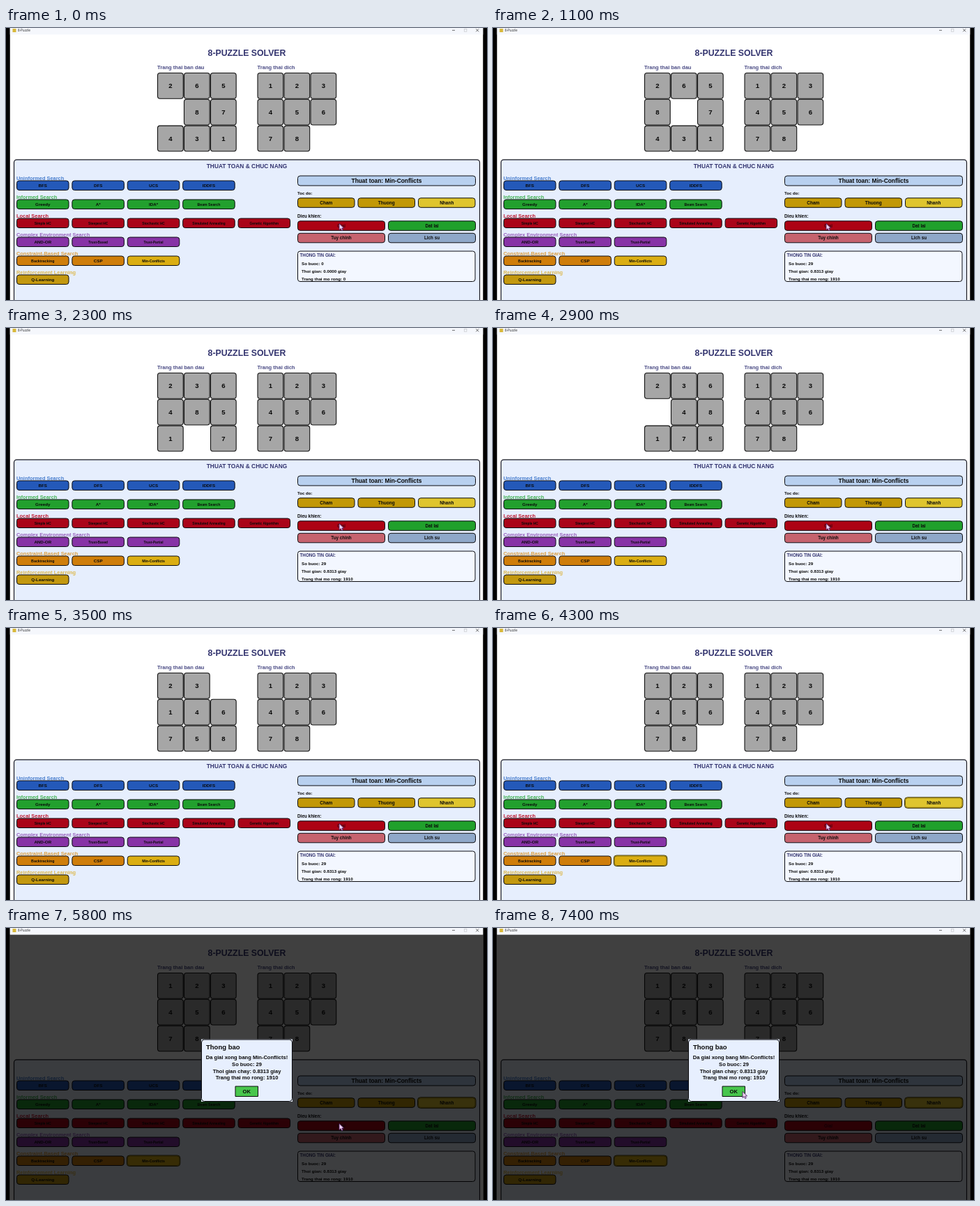
An HTML page with a canvas for the animation above (8400 ms loop, 690 by 390 pixels).

```html
<!DOCTYPE html>
<html lang="vi">
<head>
<meta charset="utf-8">
<title>8-Puzzle</title>
<style>
html, body { margin: 0; width: 100%; height: 100%; overflow: hidden; background: #000; }
canvas { display: block; width: 690px; height: 390px; }
</style>
</head>
<body>
<canvas id="stage" width="690" height="390"></canvas>
<script>
const ctx = document.getElementById('stage').getContext('2d');
const LOOP = 8400;
const STEP_START = 442, STEP = 130;
const SOLVED = 4212, DIALOG = 4350;
const LEFT = 5.5, WIDTH = 679, BAR = 9.4;
const INK = '#33346f';
const FONT = '"Liberation Sans", Arial, sans-serif';

// Blank moves from the start board to the goal
const START = '265087431', GOAL = '123456780';
const MOVES = 'RLRLR' + 'DRUULDLDR' + 'RULLDRRUU' + 'LLDRDR';
const SHIFT = { L: -1, R: 1, U: -3, D: 3 };
const boards = [START];
for (const m of MOVES) {
  const b = [...boards[boards.length - 1]];
  const i = b.indexOf('0'), j = i + SHIFT[m];
  [b[i], b[j]] = [b[j], b[i]];
  boards.push(b.join(''));
}

const GROUPS = [
  ['Uninformed Search', '#4a7fce', '#2459b9', ['BFS', 'DFS', 'UCS', 'IDDFS']],
  ['Informed Search', '#43b355', '#22a02e', ['Greedy', 'A*', 'IDA*', 'Beam Search']],
  ['Local Search', '#c01c32', '#aa0519',
    ['Simple HC', 'Steepest HC', 'Stochastic HC', 'Simulated Annealing', 'Genetic Algorithm']],
  ['Complex Environment Search', '#9862bd', '#8733a6', ['AND-OR', 'Trust-Based', 'Trust-Partial']],
  ['Constraint-Based Search', '#dda041', '#cf7e0b', ['Backtracking', 'CSP', 'Min-Conflicts']],
  ['Reinforcement Learning', '#ddb84c', '#c3980f', ['Q-Learning']]
];
const SMALL = { 'Beam Search': 5.2, 'Backtracking': 5.3, 'Min-Conflicts': 5.2 };

function text(s, x, y, size, color = '#0a0a0a', align = 'left') {
  ctx.font = `bold ${size}px ${FONT}`;
  ctx.textAlign = align;
  ctx.textBaseline = 'alphabetic';
  ctx.fillStyle = color;
  ctx.fillText(s, x, y + size * 0.36);
}

function box(x, y, w, h, r, fill, line = '#0c0c10', lw = 1) {
  ctx.beginPath();
  ctx.roundRect(x, y, w, h, r);
  ctx.fillStyle = fill;
  ctx.fill();
  ctx.strokeStyle = line;
  ctx.lineWidth = lw;
  ctx.stroke();
}

function button(label, x, y, w, fill, size = 6.3, glow = false, color) {
  if (glow) box(x - 1, y - 1, w + 2, 15.5, 4, '#f2d23c', '#3a3208', 1);
  box(x, y, w, 13.5, 3.5, fill, glow ? '#8a7410' : undefined);
  text(label, x + w / 2, y + 6.8, size, color, 'center');
}

function drawBoard(board, x, y) {
  [...board].forEach((n, i) => {
    if (n === '0') return;
    const tx = x + (i % 3) * 38, ty = y + Math.floor(i / 3) * 37.8;
    box(tx + 0.5, ty + 0.5, 36.7, 36.7, 3.5, '#a6a6a6', '#111', 1.1);
    text(n, tx + 18.8, ty + 18.7, 9.6, '#0a0a0a', 'center');
  });
}

function drawTitleBar() {
  ctx.fillStyle = '#f5f7fc';
  ctx.fillRect(LEFT, 0, WIDTH, BAR);
  ctx.fillStyle = '#d8b83a';
  ctx.fillRect(9.5, 1, 5, 5);
  ctx.font = '4.6px "Open Sans", sans-serif';
  ctx.textAlign = 'left';
  ctx.fillStyle = '#222';
  ctx.fillText('8-Puzzle', 17, 4.9);
  ctx.lineWidth = 0.7;
  ctx.strokeStyle = '#333';
  ctx.beginPath();
  ctx.moveTo(640, 3.3); ctx.lineTo(644, 3.3);
  ctx.moveTo(674.2, 1.3); ctx.lineTo(678.2, 5.3);
  ctx.moveTo(678.2, 1.3); ctx.lineTo(674.2, 5.3);
  ctx.stroke();
  ctx.strokeStyle = '#c3c5ca';
  ctx.strokeRect(657.3, 1.5, 3.6, 3.6);
}

function drawAlgorithms(glow) {
  GROUPS.forEach(([name, tint, fill, items], row) => {
    const y = 219 + row * 27;
    text(name, 15, y - 4, 7.4, tint);
    items.forEach((item, col) => {
      const chosen = item === 'Min-Conflicts';
      const size = SMALL[item] || (item.length > 8 && item !== 'Q-Learning' ? 4.8 : 6.2);
      button(item, 15.5 + col * 79.4, y, 74.5, chosen ? '#dbae12' : fill, size, chosen && glow);
    });
  });
}

function drawControls(solved, glow) {
  box(418.5, 212, 255, 14, 3.5, '#b8d0ef');
  text('Thuat toan: Min-Conflicts', 546, 219, 8.4, '#0a0a0a', 'center');

  text('Toc do:', 418, 237, 6.1);
  button('Cham', 418.5, 243.8, 81.5, '#c29806', 6.5);
  button('Thuong', 505, 243.8, 81.5, '#c29806', 6.5);
  button('Nhanh', 591.5, 243.8, 81.5, '#dfc52e', 6.5, glow);

  text('Dieu khien:', 418, 269.8, 6.4);
  button('Giai', 418.5, 276.8, 125, '#ad0314', 6.3, false, '#4a000e');
  button('Dat lai', 548.5, 276.8, 125, '#20a02c');
  button('Tuy chinh', 418.5, 294.3, 125, '#c6636e');
  button('Lich su', 548.5, 294.3, 125, '#8fa8c9');

  box(418.5, 320, 254.5, 43.5, 3.5, '#f3f7ff');
  text('THONG TIN GIAI:', 421.5, 326.2, 6.3, INK);
  text(`So buoc: ${solved ? 29 : 0}`, 424, 338, 6.2);
  text(`Thoi gian: ${solved ? '0.8313' : '0.0000'} giay`, 424, 349, 6.2);
  text(`Trang thai mo rong: ${solved ? 1910 : 0}`, 424, 360, 6.2);
}

function drawDialog() {
  ctx.fillStyle = 'rgba(0, 0, 0, 0.75)';
  ctx.fillRect(LEFT, BAR, WIDTH, 390 - BAR);
  ctx.fillStyle = '#e7effe';
  ctx.fillRect(280, 159.5, 131, 89.5);
  box(280.5, 160, 130, 88.5, 4, '#e7effe');
  text('Thong bao', 287, 171, 9.5);
  ['Da giai xong bang Min-Conflicts!', 'So buoc: 29',
    'Thoi gian chay: 0.8313 giay', 'Trang thai mo rong: 1910'
  ].forEach((s, i) => text(s, 345.5, 185.7 + i * 9.6, 7.55, '#0a0a0a', 'center'));
  box(329, 227, 32.5, 14.5, 0, '#48c64c');
  text('OK', 345.2, 234.2, 7.6, '#0a0a0a', 'center');
}

function ease(t, from, to) {
  const p = Math.min(1, Math.max(0, (t - from) / (to - from)));
  return p * p * (3 - 2 * p);
}

function drawCursor(t) {
  const k = 0.91 * ease(t, 5800, 6650) + 0.09 * ease(t, 6650, 7120);
  ctx.save();
  ctx.translate(478 - 120 * k, 280.5 - 46 * k);
  ctx.scale(0.9, 0.9);
  ctx.beginPath();
  [[0, 0], [0, 10], [2.4, 7.9], [4, 11.2], [5.8, 10.4], [4.3, 7.3], [7.3, 7]]
    .forEach(([x, y]) => ctx.lineTo(x, y));
  ctx.closePath();
  ctx.fillStyle = '#efd3f0';
  ctx.fill();
  ctx.strokeStyle = '#4a1760';
  ctx.lineWidth = 0.9;
  ctx.stroke();
  ctx.restore();
}

function draw(t) {
  const step = Math.floor((t - STEP_START) / STEP);
  const board = boards[Math.min(MOVES.length, Math.max(0, step))];
  const glow = t >= SOLVED;

  ctx.fillStyle = '#000';
  ctx.fillRect(0, 0, 690, 390);
  ctx.save();
  ctx.beginPath();
  ctx.rect(LEFT, 0, WIDTH, 390);
  ctx.clip();
  ctx.fillStyle = '#fff';
  ctx.fillRect(LEFT, 0, WIDTH, 390);

  text('8-PUZZLE SOLVER', 345.5, 36, 12.3, INK, 'center');
  text('Trang thai ban dau', 217, 56, 7.6, '#4b4c85');
  text('Trang thai dich', 360.5, 56, 7.6, '#4b4c85');
  drawBoard(board, 217, 64);
  drawBoard(GOAL, 360.5, 64);

  box(11.5, 188.8, 668, 215, 4, '#e6eefd', '#1a1a22', 1.2);
  text('THUAT TOAN & CHUC NANG', 345.5, 198, 8.4, INK, 'center');
  drawAlgorithms(glow);
  drawControls(t >= STEP_START, glow);
  if (t >= DIALOG) drawDialog();
  drawTitleBar();
  drawCursor(t);
  ctx.restore();
}

const begin = performance.now();
function frame() {
  draw((performance.now() - begin) % LOOP);
  requestAnimationFrame(frame);
}
frame();
</script>
</body>
</html>
```
